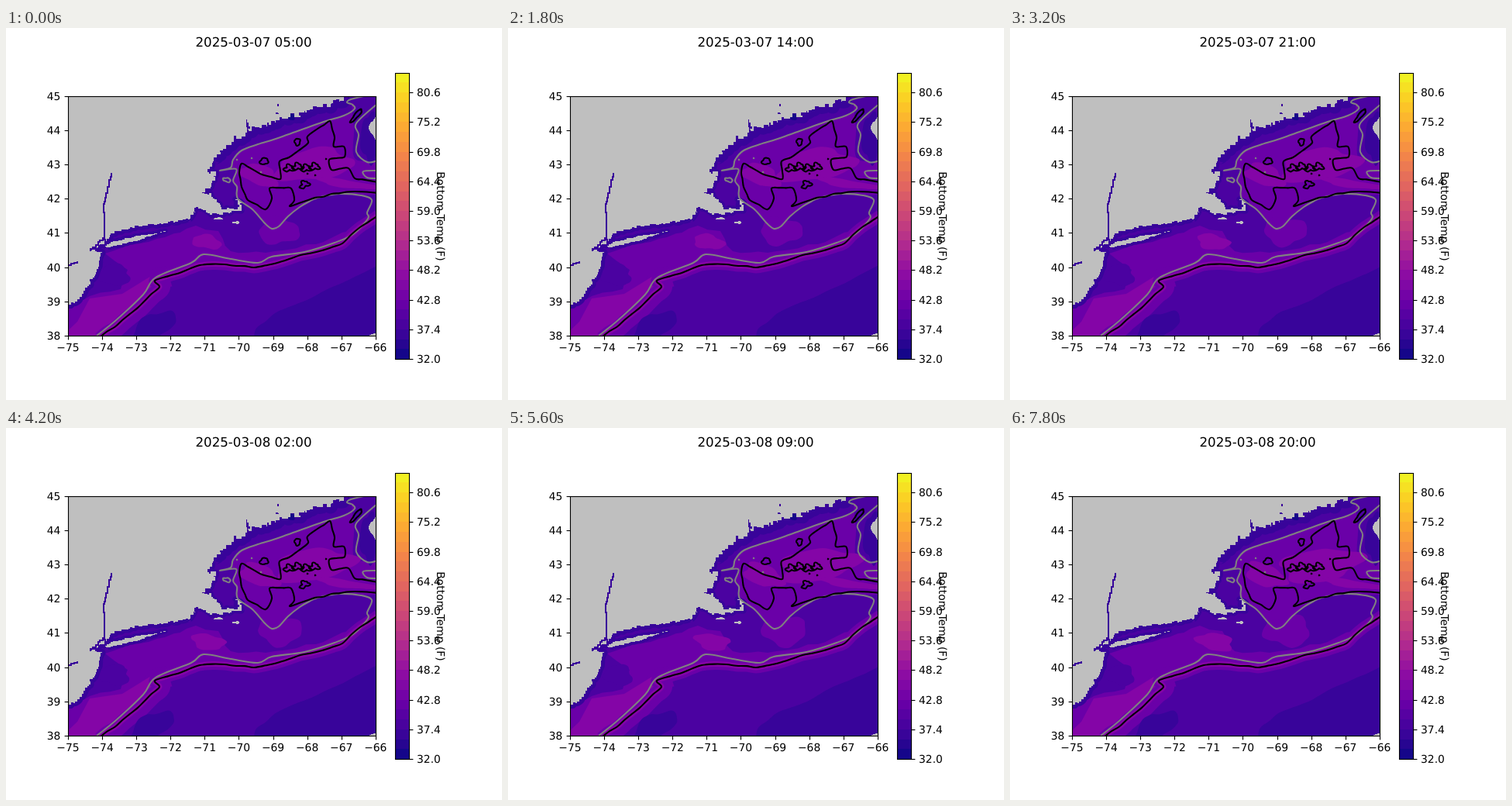
Write an HTML page that moves like this. It is 640 by 480 pixels and loops after 8000 ms.

```html
<!DOCTYPE html>
<html lang="en">
<head>
<meta charset="utf-8">
<title>Bottom temperature</title>
<style>
  html, body { margin: 0; width: 100%; height: 100%; overflow: hidden; background: #fff; }
  svg { display: block; width: 640px; height: 480px; }
  text { font: 13.89px "DejaVu Sans", sans-serif; text-rendering: geometricPrecision; }
  #title { font-size: 16.67px; }
  .line { fill: none; stroke-width: 2.08; stroke-linejoin: round; }
  .axis { fill: none; stroke: #000; stroke-width: 1.11; }
  .land { fill: #bfbfbf; shape-rendering: crispEdges; }
  .river { fill: none; stroke: #38049a; stroke-width: 1.6; shape-rendering: crispEdges; }
</style>
</head>
<body>
<svg viewBox="0 0 640 480">
  <clipPath id="frame"><rect x="80" y="88" width="397" height="309"/></clipPath>
  <g id="map" clip-path="url(#frame)"></g>
  <g id="axes"></g>
  <text id="title" x="319.5" y="24" text-anchor="middle"></text>
</svg>
<script>
const STEP = 200, STEPS = 40, HOUR = 3600000, TIDE_HOURS = 12.4;
const START = Date.UTC(2025, 2, 7, 5);
const COLD = '#38049a', COOL = '#4b02a1', MILD = '#6a00a8', WARM = '#8405a7';
const GRAY = '#808080', BLACK = '#000';
const map = document.getElementById('map');
const axes = document.getElementById('axes');
const title = document.getElementById('title');

function add(parent, tag, attrs, text) {
  const el = document.createElementNS('http://www.w3.org/2000/svg', tag);
  for (const key in attrs) el.setAttribute(key, attrs[key]);
  if (text) el.textContent = text;
  return parent.appendChild(el);
}

let seed = 7;
const random = () => (seed = seed * 16807 % 2147483647) / 2147483647;
const parse = s => s.trim().split(/\s+/).map(p => p.split(',').map(Number));

// Catmull-Rom spline through the points
function smooth(pts, closed) {
  const n = pts.length;
  const at = i => closed ? pts[(i + n) % n] : pts[Math.max(0, Math.min(n - 1, i))];
  let d = 'M' + pts[0];
  for (let i = 0; i < (closed ? n : n - 1); i++) {
    const [a, b, c, e] = [at(i - 1), at(i), at(i + 1), at(i + 2)];
    const handle = (p, q, r, k) => [0, 1].map(j => p[j] + k * (r[j] - q[j]) / 6);
    d += `C${handle(b, a, c, 1)} ${handle(c, b, e, -1)} ${c}`;
  }
  return d + (closed ? 'Z' : '');
}

// Cuts segments into short pieces and shifts each joint at random
function roughen(pts, piece, amount) {
  return pts.flatMap((p, i) => {
    if (!i) return [p];
    const [x, y] = pts[i - 1], dx = p[0] - x, dy = p[1] - y;
    const n = Math.max(1, Math.round(Math.hypot(dx, dy) / piece));
    const shift = () => (random() - .5) * amount;
    return Array.from({ length: n }, (_, k) => {
      const t = (k + 1) / n;
      return t === 1 ? p : [x + dx * t + shift(), y + dy * t + shift()];
    });
  });
}

const stairs = pts => pts.map(([x, y], i) =>
  (i ? `H${Math.round(x)}V${Math.round(y)}` : `M${Math.round(x)},${Math.round(y)}`)).join('');

// Lobed ellipse
function blob(x, y, rx, ry, tilt = 0, lobes = .12) {
  const n = 18, turn = tilt * Math.PI / 180;
  return smooth(Array.from({ length: n }, (_, i) => {
    const a = i * 2 * Math.PI / n;
    const r = 1 + lobes * (Math.sin(3 * a + rx) + .7 * Math.sin(5 * a + ry));
    const u = rx * r * Math.cos(a), v = ry * r * Math.sin(a);
    return [x + u * Math.cos(turn) - v * Math.sin(turn), y + u * Math.sin(turn) + v * Math.cos(turn)];
  }), true);
}

const fill = (color, d) => add(map, 'path', { fill: color, d });
const line = (pts, color, width = 2.08) =>
  add(map, 'path', { class: 'line', d: smooth(pts), style: `stroke:${color};stroke-width:${width}` });

// Key points of the depth contours, shared by the temperature bands
const gulfRim = parse(`446,98 450,104 436,113 410,121 365,137 345,144 325,150 304,158 293,170 290,180
  276,184 297,182 293,197 298,205 299,220 318,234 334,252 343,259 352,256 364,243 379,231 391,224`);
const bankRim = parse(`402,219 430,214 458,216 472,222 466,238 467,246 448,266 424,277 385,289 343,295
  325,303 290,298 255,292 239,303 193,322 177,344 142,377 117,397`);
const shelfEdge = roughen(parse(`480,242 457,257 434,278 408,287 380,293 350,303 320,309 282,305 250,306
  210,320 192,326 198,334 178,353 150,377 120,400`), 14, 2);
const basin = roughen(parse(`480,213 450,211 420,214 390,222 366,230 372,222 368,207 340,207 343,220
  335,234 312,222 304,205 301,186 304,175 330,189 354,195 353,172 365,167 390,148 389,140 402,130
  418,120 424,141 423,153 436,153 437,166 417,170 420,183 442,181 450,194 480,199`), 11, 2);

add(map, 'rect', { x: 80, y: 88, width: 397, height: 309, fill: COOL });
fill(MILD, smooth([...gulfRim, ...parse('430,213 480,213 480,176 450,168 449,130')], true));

const shelf = parse('465,252 400,279 335,290 290,288 274,262 245,255 205,270 128,291 157,312 148,337 108,346 70,368 70,400');
const inshore = shelf.reverse();
fill(MILD, 'M' + [...shelfEdge, ...roughen(inshore, 12, 4)].join('L'));
const slope = shelfEdge.slice(-11);
line(slope, MILD, 28);
fill(WARM, 'M' + [...slope, ...parse('70,400 92,379 108,349 150,343 184,322 222,308')].join('L'));
line(shelfEdge, MILD, 15);
line(shelfEdge, WARM, 7);

// Drifting water masses: colour, x, y, radii, tilt, drift over the loop, growth
const masses = [
  [MILD, 352, 262, 26, 17, 0, 5, .15],
  [WARM, 397, 177, 50, 20, -8, 3, .05],
  [WARM, 327, 190, 25, 13, 20, 2, .08],
  [WARM, 440, 201, 40, 5, 8, 0, 0],
  [WARM, 259, 276, 19, 9, 10, 5, .25],
  [COOL, 140, 319, 19, 14, 10, 2, -.05],
  [COLD, 190, 387, 32, 16, -35, -3, 0],
  [COLD, 469, 142, 11, 32, 0, 0, 0]
].map(([color, ...shape]) => ({ el: fill(color, ''), shape }));
const abyss = add(map, 'path', { fill: COLD });
const abyssEdge = roughen(parse('490,301 450,321 400,345 347,368 322,389 320,410'), 16, 4);

// Coastline, with a rougher north shore and cold water along it
const north = roughen(parse(`437,88 420,98 396,105 375,113 356,115 352,98 350,122 330,129 313,131 311,118
  309,135 290,147 277,158 268,172`), 3, 7);
const bay = roughen(parse(`268,172 260,186 271,187 265,205 253,213 265,215 278,234 301,232 296,221 303,224
  304,236 265,241 248,231 237,247`), 3, 3.5);
const south = roughen(parse(`237,247 200,252 163,257 137,265 127,279 109,287 124,290 117,315 105,335 92,353
  80,357`), 3, 3);
const longIsland = roughen(parse('125,282 135,276 165,269 206,262 170,275 132,283'), 3, 1.5);

line(north, COLD, 17);
line(bay, COLD, 7);
line(south, COLD, 9);
line(longIsland, COLD, 6);
fill('#150789', blob(368, 115, 5, 4));

const land = d => add(map, 'path', { class: 'land', d });
land(stairs([...north, ...bay, ...south, [70, 357], [70, 80], [437, 80]]) + 'Z');
land(stairs(longIsland) + 'Z');
land(blob(274, 246, 6, 1.5));
land(blob(297, 251, 5, 1.5));
land(blob(481, 129, 11, 17));
land(blob(480, 399, 14, 6, -20));
for (const river of ['137,188 131,209 126,231 128,277', '128,271 109,288', '80,306 92,301'])
  add(map, 'path', { class: 'river', d: stairs(roughen(parse(river), 4, 1.5)) });

line([...gulfRim, ...bankRim], GRAY);
line(parse('462,88 445,92 440,96 446,98'), GRAY);
line(parse('480,97 452,123 455,138 452,160 466,173 480,171'), GRAY);
line(parse('480,184 461,185 466,193 480,194'), GRAY);
line(shelfEdge, BLACK);
line(basin, BLACK);

// Small closed contours
const ring = (color, ...shape) => add(map, 'path', { class: 'line', stroke: color, d: blob(...shape) });
ring(GRAY, 285, 196, 5, 2.5, 15);
ring(BLACK, 376, 147, 3.5, 4.5);
ring(BLACK, 333, 172, 5.5, 4, -15);
ring(BLACK, 452, 113, 11, 2.5, -50);
ring(BLACK, 385, 202, 6, 4, -30, .3);
for (let i = 0; i < 4; i++) ring(BLACK, 365 + 11 * i, 181 - 2 * (i % 2), 6, 4, -10, .3);
for (const [x, y] of parse('298,170 317,168 329,186')) fill(GRAY, blob(x, y, 1.2, 1.2));
for (const [x, y] of parse('389,188 399,190 413,169')) fill(BLACK, blob(x, y, 1.3, 1.3));

// Axes
const DEG = 44.09, BOTTOM = 396.71;
const tick = d => add(axes, 'path', { class: 'axis', d });
const snap = v => Math.round(v) + .5;
const label = (x, y, anchor, text) => add(axes, 'text', { x, y: Math.round(y), 'text-anchor': anchor }, text);
add(axes, 'rect', { class: 'axis', x: 80.5, y: 88.5, width: 397, height: 309 });
for (let i = 0; i < 10; i++) {
  const x = 80 + i * DEG;
  tick(`M${snap(x)},397.5v4.9`);
  label(x, 417, 'middle', '\u2212' + (75 - i));
}
for (let i = 0; i < 8; i++) {
  const y = BOTTOM - i * DEG;
  tick(`M80.5,${snap(y)}h-4.9`);
  label(70.4, y + 5, 'end', String(38 + i));
}

// Colour bar
const plasma = ['0c0786', '40039c', '6a00a7', '8f0da3', 'b02a8f', 'ca4678', 'e06461', 'f1824c', 'fca635', 'fccc25', 'eff821']
  .map(hex => [0, 2, 4].map(i => parseInt(hex.slice(i, i + 2), 16)));
function shade(v) {
  const i = Math.floor(v * 10), k = v * 10 - i;
  return `rgb(${plasma[i].map((c, j) => Math.round(c + (plasma[i + 1][j] - c) * k))})`;
}
const LEVELS = 29, LEVEL = 369.6 / LEVELS, BASE = 427.2;
for (let i = 0; i < LEVELS; i++) {
  add(axes, 'rect', {
    x: 502, y: BASE - (i + 1) * LEVEL, width: 18.5, height: LEVEL,
    fill: shade((i + .5) / LEVELS), 'shape-rendering': 'crispEdges'
  });
}
add(axes, 'rect', { class: 'axis', x: 502.5, y: 58.5, width: 18, height: 369 });
for (let i = 0; i < 10; i++) {
  const y = BASE - i * 3 * LEVEL;
  tick(`M520.5,${snap(y)}h4.9`);
  label(530, y + 5, 'start', (32 + i * 5.4).toFixed(1));
}
add(axes, 'text', { transform: 'translate(555.5 243) rotate(90)', 'text-anchor': 'middle' }, 'Bottom Temp (F)');

let shown = -1;
function draw() {
  const step = Math.floor(performance.now() / STEP) % STEPS;
  if (step !== shown) {
    shown = step;
    const progress = step / (STEPS - 1);
    const tide = Math.sin(step * 2 * Math.PI / TIDE_HOURS);
    for (const { el, shape: [x, y, rx, ry, tilt, drift, growth] } of masses) {
      const size = 1 + growth * progress;
      el.setAttribute('d', blob(x + drift * progress + tide, y, rx * size, ry * size, tilt));
    }
    const edge = abyssEdge.map(([x, y], i) => [x, y + tide * Math.sin(i)]);
    abyss.setAttribute('d', smooth(edge) + 'H490Z');
    title.textContent = new Date(START + step * HOUR).toISOString().slice(0, 16).replace('T', ' ');
  }
  requestAnimationFrame(draw);
}
draw();
</script>
</body>
</html>
```
